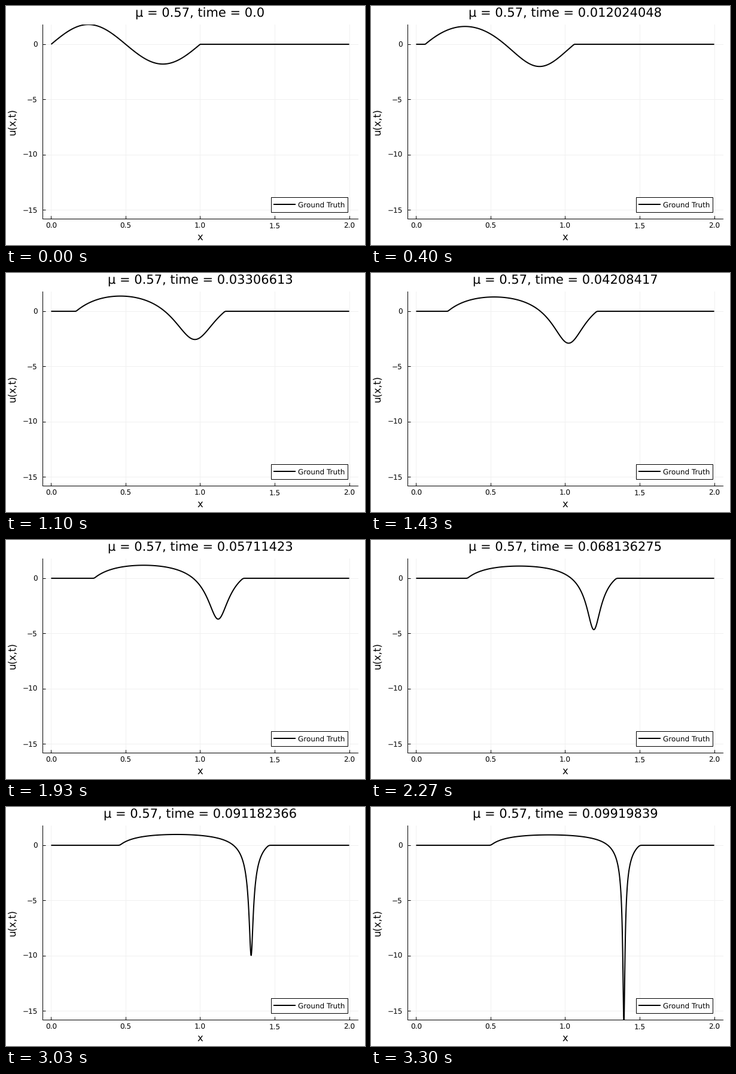
Animation, 600 px wide and 400 px high, one loop 3330 ms. Source, as a matplotlib script:

```python
import numpy as np
import matplotlib.pyplot as plt
from matplotlib.animation import FuncAnimation
from matplotlib.patches import Rectangle

W, H, DPI = 600, 400, 100
PT = 72 / DPI                     # points per pixel
FRAMES, LOOP_MS = 100, 3330
LEFT, RIGHT, TOP, BOTTOM = 60.5, 588.5, 31, 355.5

MU, SPEED, VISC = 0.57, 5.0, 2.2e-4
DT, RATE, SUBSTEPS = 1 / 998, 1.0105, 20

plt.rcParams.update({
    "font.family": "DejaVu Sans",
    "text.hinting": "none",
    "path.simplify": False,
})


def solve(x):
    """Slope of a viscous Burgers wave, on a grid that moves with the flow."""
    pos = np.linspace(-1, 2, 1201)
    bump = np.where((pos > 0) & (pos < 1), np.sin(np.pi * pos) ** 2, 0)
    vel = SPEED * (1 + MU * bump)
    h = DT * RATE / SUBSTEPS
    curves = []
    for _ in range(FRAMES):
        mid = (pos[1:] + pos[:-1]) / 2
        slope = np.diff(vel) / np.diff(pos)
        curves.append(np.interp(x, mid, slope / SPEED))
        for _ in range(SUBSTEPS):
            mid = (pos[1:] + pos[:-1]) / 2
            slope = np.diff(vel) / np.diff(pos)
            vel[1:-1] += h * VISC * np.diff(slope) / np.diff(mid)
            pos = pos + h * vel
    return curves


x = np.linspace(0, 2, 1001)
curves = solve(x)

fig = plt.figure(figsize=(W / DPI, H / DPI), dpi=DPI, facecolor="white")
ax = fig.add_axes([LEFT / W, 1 - BOTTOM / H,
                   (RIGHT - LEFT) / W, (BOTTOM - TOP) / H])
ax.set_xlim(-0.06, 2.06)
ax.set_ylim(-15.77, MU * np.pi)


def label(px, py, text, size, **kw):
    kw = {"ha": "center", "va": "baseline", **kw}
    return fig.text(px / W, 1 - py / H, text, fontsize=size * PT, **kw)


# Axes, grid and tick labels
x_ticks = [0, 0.5, 1, 1.5, 2]
y_ticks = [0, -5, -10, -15]
ax.set_xticks(x_ticks)
ax.set_yticks(y_ticks)
ax.set_axisbelow(True)
ax.grid(color="#f0f0f0", linewidth=PT)
ax.tick_params(direction="in", length=5 * PT, width=PT,
               labelbottom=False, labelleft=False)
for side in ("top", "right"):
    ax.spines[side].set_visible(False)
for side in ("left", "bottom"):
    ax.spines[side].set_linewidth(PT)

for v in x_ticks:
    label(75.5 + 249 * v, 371.8, f"{v:.1f}", 12)
for v in y_ticks:
    py = TOP + (MU * np.pi - v) * (BOTTOM - TOP) / (MU * np.pi + 15.77)
    label(52.8, py + 4.4, str(v).replace("-", "\u2212"), 12, ha="right")
label(324.5, 391.5, "x", 16.5)
label(11.3, 193.3, "u(x,t)", 16.5, va="center", rotation=90)
title = label(324.5, 18.5, "", 21)

line, = ax.plot([], [], color="black", linewidth=2 * PT,
                solid_joinstyle="round", solid_capstyle="butt")

# Legend, in pixel coordinates
key = fig.add_axes([0, 0, 1, 1])
key.set_xlim(0, W)
key.set_ylim(H, 0)
key.axis("off")
key.add_patch(Rectangle((442.5, 319.5), 128, 25.5, facecolor="white",
                        edgecolor="black", linewidth=PT))
key.plot([447, 483.5], [332, 332], color="black", linewidth=2 * PT,
         solid_capstyle="butt")
label(487.6, 336.4, "Ground Truth", 12, ha="left")


def update(k):
    line.set_data(x, curves[k])
    title.set_text(f"\u03bc = {MU}, time = {str(np.float32(k * DT))}")
    return line, title


anim = FuncAnimation(fig, update, frames=FRAMES, interval=LOOP_MS / FRAMES,
                     repeat=True)
plt.show()
```
